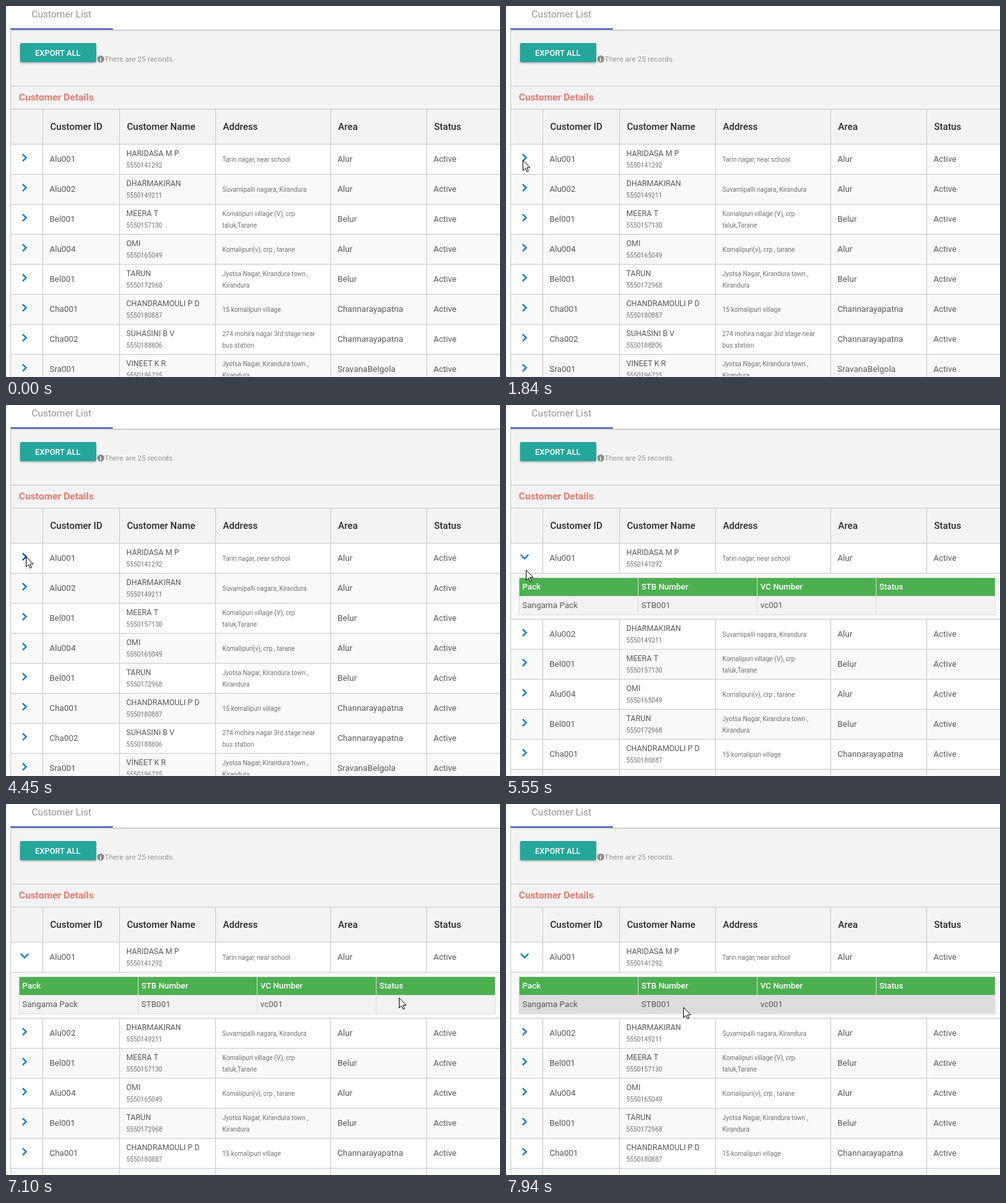
Recreate the animation shown at these times as an HTML page with a canvas. Size 772 by 581 pixels, loop 8000 ms.

```html
<!DOCTYPE html>
<html lang="en">
<head>
<meta charset="utf-8">
<title>Customer List</title>
<style>
  html, body { margin: 0; width: 100%; height: 100%; overflow: hidden; background: #fff; }
  canvas { display: block; width: 772px; height: 581px; }
</style>
</head>
<body>
<canvas id="stage" width="772" height="581"></canvas>
<script>
const ctx = document.getElementById('stage').getContext('2d');
const W = 772, H = 581, LOOP = 8000;
const LINE = '#c8c8c8', INK = '#5a5a5a', SOFT = '#727272';
const ROW = 47, TABLE_TOP = 216, DETAIL = 72;
const HEADS = ['Customer ID', 'Customer Name', 'Address', 'Area', 'Status'];
const COLS = [57, 177, 327, 507, 657];

// area, serial, name, address lines
const ROWS = [
  ['Alur', 1, 'HARIDASA M P', 'Tarin nagar, near school'],
  ['Alur', 2, 'DHARMAKIRAN', 'Suvarnipalli nagara, Kirandura'],
  ['Belur', 1, 'MEERA T', 'Komalipuri village (V), crp', 'taluk,Tarane'],
  ['Alur', 4, 'OMI', 'Komalipuri(v), crp , tarane'],
  ['Belur', 1, 'TARUN', 'Jyotsa Nagar, Kirandura town ,', 'Kirandura'],
  ['Channarayapatna', 1, 'CHANDRAMOULI P D', '15 komalipuri village'],
  ['Channarayapatna', 2, 'SUHASINI B V', '274 mohira nagar 3rd stage near', 'bus station'],
  ['SravanaBelgola', 1, 'VINEET K R', 'Jyotsa Nagar, Kirandura town ,', 'Kirandura']
];

// pointer moves: first step, last step, x and y reached; it rests in between
const ENTRY = [617, 554];
const MOVES = [
  [0, 10, 54, 267], [10, 13, 31, 236], [13, 18, 26, 241], [18, 24, 37, 232],
  [24, 33, 21, 237], [33, 35, 21, 244], [37, 42, 31, 237], [65, 68, 31, 278],
  [69, 80, 454, 294], [80, 86, 614, 303], [86, 91, 499, 315], [91, 97, 277, 318]
];

const easeOut = k => Math.sin(k * Math.PI / 2);
const clamp = k => Math.min(1, Math.max(0, k));

function rect(x, y, w, h, color) {
  ctx.fillStyle = color;
  ctx.fillRect(x, y, w, h);
}

function text(str, x, y, size, color = INK, weight = 400) {
  ctx.font = `${weight} ${size}px Roboto, "Open Sans", sans-serif`;
  ctx.fillStyle = color;
  ctx.fillText(str, x, y);
}

function trace(points, x, y) {
  ctx.beginPath();
  points.forEach(([dx, dy]) => ctx.lineTo(x + dx, y + dy));
}

function chevron(x, y, down, color) {
  trace(down ? [[-6, -3], [0, 3], [6, -3]] : [[-3, -5.4], [2.4, 0], [-3, 5.4]], x, y);
  ctx.strokeStyle = color;
  ctx.lineWidth = 2.4;
  ctx.stroke();
}

function drawButton() {
  ctx.save();
  ctx.shadowColor = 'rgba(0,0,0,.3)';
  ctx.shadowBlur = 3;
  ctx.shadowOffsetY = 1.5;
  ctx.fillStyle = '#26a69a';
  ctx.beginPath();
  ctx.roundRect(22, 58, 119, 30, 2);
  ctx.fill();
  ctx.restore();
  text('EXPORT ALL', 45.5, 78, 12.4, '#fff', 500);
}

function drawInfo() {
  ctx.fillStyle = '#8a8a8a';
  ctx.beginPath();
  ctx.arc(148, 83, 5.5, 0, Math.PI * 2);
  ctx.fill();
  text('i', 146.4, 86.5, 9.5, '#fff', 700);
  text('There are 25 records.', 154, 87, 11.6, '#999');
}

function drawTop() {
  rect(0, 0, W, H, '#fff');
  text('Customer List', 40, 18, 15, '#949494');
  rect(7, 37, W, H, '#f3f3f3');
  rect(7, 37, W, 2, '#cfcfcf');
  rect(7, 35, 160, 2, '#3f51b5');
  drawButton();
  drawInfo();
  rect(7, 125, W, 1, LINE);
  text('Customer Details', 20, 148, 15.1, '#e27c71', 700);
  rect(7, 161, W, 1, LINE);
  HEADS.forEach((head, i) => {
    rect(COLS[i], 161, 1, 55, LINE);
    text(head, COLS[i] + 12, 194, 14.7, '#2a2a2a', 500);
  });
}

function drawRow([area, serial, name, ...address], i, open, lit) {
  const pushed = open && i > 0;
  const y = TABLE_TOP + ROW * i + (pushed ? DETAIL : 0);
  const id = area.slice(0, 3) + String(serial).padStart(3, '0');
  const phone = 5550141292 + i * 7919;

  rect(8, y, W, ROW, (i + pushed) % 2 ? '#f9f9f9' : '#fff');
  rect(7, y, W, 1, LINE);
  COLS.forEach(x => rect(x, y, 1, ROW, LINE));
  chevron(29, y + 21.5, open && i === 0, lit && i === 0 ? '#07529a' : '#0f7dc4');
  text(id, 68, y + 28, 13);
  text(name, 188, y + 19, 12.1);
  text(phone, 188, y + 37, 10, SOFT);
  const top = address.length > 1 ? 19 : 28;
  address.forEach((line, k) => text(line, 338, y + top + 18 * k, 10, SOFT));
  text(area, 518, y + 28, 13.2);
  text('Active', 668, y + 28, 13);
}

function drawDetail(hover) {
  const y = TABLE_TOP + ROW;
  const heads = ['Pack', 'STB Number', 'VC Number', 'Status'];
  const cells = ['Sangama Pack', 'STB001', 'vc001', ''];
  rect(8, y, W, DETAIL, '#f9f9f9');
  rect(7, y, W, 1, LINE);
  rect(20, y + 7, 745, 59, '#ddd');
  heads.forEach((head, i) => {
    const x = 20 + 186 * i;
    rect(x + 1, y + 8, 185, 28, '#4caf50');
    if (!hover) rect(x + 1, y + 37, 185, 28, '#f2f2f2');
    text(head, x + 5.5, y + 26, 12.9, '#fff', 500);
    text(cells[i], x + 5.5, y + 55, 13);
  });
}

function pointerAt(step) {
  let [x, y] = ENTRY;
  for (const [from, to, nextX, nextY] of MOVES) {
    const k = easeOut(clamp((step - from) / (to - from)));
    x += (nextX - x) * k;
    y += (nextY - y) * k;
  }
  return [Math.round(x), Math.round(y)];
}

function drawPointer([x, y]) {
  trace([[0, 0], [0, 16], [3.7, 12.6], [6.2, 18], [8.4, 17], [6.2, 11.6], [11, 11.6]], x + .5, y + .5);
  ctx.closePath();
  ctx.fillStyle = '#fff';
  ctx.fill();
  ctx.strokeStyle = '#000';
  ctx.lineWidth = 1;
  ctx.stroke();
}

function draw(t) {
  const step = Math.floor((t - 446) / 77.1);
  const open = t >= 4615;
  const lit = t >= 4445 && step < 66;

  drawTop();
  ROWS.forEach((row, i) => drawRow(row, i, open, lit));
  if (open) drawDetail(step > 86);
  rect(7, 38, 1, H, LINE);
  rect(0, 580, W, 1, '#f4f4f4');
  if (step >= 0) drawPointer(pointerAt(step));
}

const origin = performance.now();
function tick() {
  draw((performance.now() - origin) % LOOP);
  requestAnimationFrame(tick);
}
tick();
</script>
</body>
</html>
```
